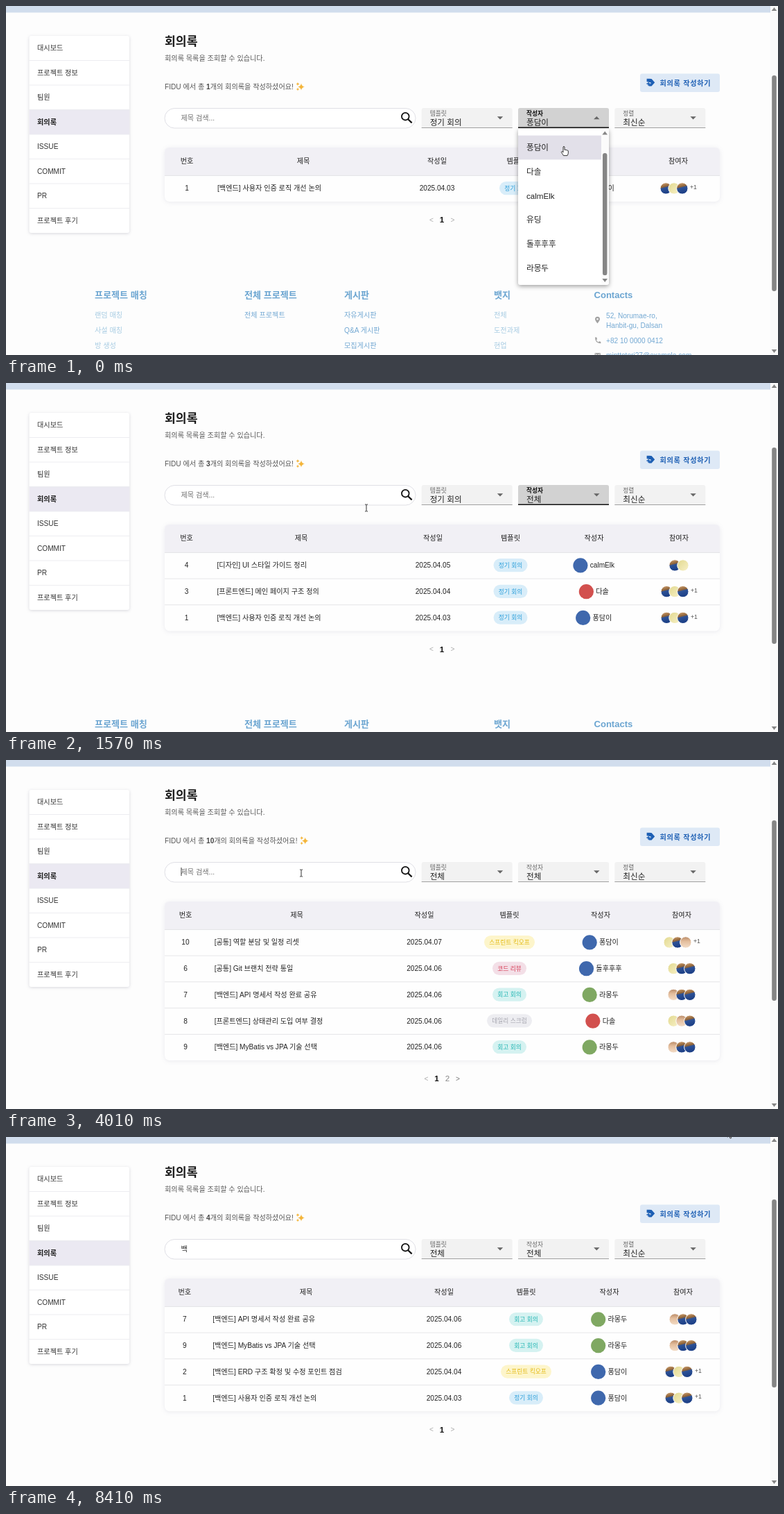
Animation, 1114 px wide and 503 px high, one loop 8510 ms. Source, as an HTML page:

```html
<!DOCTYPE html>
<html lang="ko">
<head>
<meta charset="utf-8">
<title>회의록</title>
<style>
html, body { margin: 0; width: 100%; height: 100%; overflow: hidden; background: #fdfdfd; }
svg { display: block; width: 1114px; height: 503px; }
text { font-family: "Liberation Sans", "Noto Sans CJK KR", "Noto Sans CJK", sans-serif; white-space: pre; }
.card { filter: drop-shadow(0 1px 2px rgba(60, 60, 90, .2)); }
.soft { filter: drop-shadow(0 1px 3px rgba(60, 60, 110, .1)); }
.pop { filter: drop-shadow(0 2px 3px rgba(0, 0, 0, .38)); }
</style>
</head>
<body>
<svg id="stage" viewBox="0 0 1114 503" xmlns="http://www.w3.org/2000/svg">
  <defs>
    <linearGradient id="pA" x1="0" y1="0" x2=".25" y2="1">
      <stop offset=".1" stop-color="#c99a6a"/><stop offset=".42" stop-color="#8d6238"/>
      <stop offset=".52" stop-color="#2d5297"/><stop offset="1" stop-color="#1c3f86"/>
    </linearGradient>
    <linearGradient id="pB" x1="0" y1="0" x2="1" y2="1">
      <stop offset="0" stop-color="#e2d98f"/><stop offset="1" stop-color="#f8f1c8"/>
    </linearGradient>
    <linearGradient id="pC" x1="0" y1="0" x2="0" y2="1">
      <stop offset="0" stop-color="#b98a66"/><stop offset=".4" stop-color="#e3bd9c"/><stop offset="1" stop-color="#f3ddc8"/>
    </linearGradient>
    <clipPath id="listClip"><rect x="739" y="178" width="131" height="223"/></clipPath>
  </defs>
</svg>
<script>
const LOOP = 8510, ROW = 37.75, SMALL = 8.7, BODY = 10.15, LARGE = 11.6;
const stage = document.getElementById('stage');

function el(parent, tag, attrs = {}) {
  const node = document.createElementNS('http://www.w3.org/2000/svg', tag);
  set(node, attrs);
  parent.appendChild(node);
  return node;
}
function set(node, attrs) {
  for (const k in attrs) node.setAttribute(k, attrs[k]);
}
const group = (parent, attrs) => el(parent, 'g', attrs);
const path = (parent, d, attrs) => el(parent, 'path', { d, ...attrs });
const rect = (parent, x, y, width, height, fill, more) =>
  el(parent, 'rect', { x, y, width, height, fill, ...more });
// y is the visual middle of the line
function text(parent, x, y, str, size = BODY, fill = '#333', more = {}) {
  const node = el(parent, 'text', { x, y: y + size * .37, 'font-size': size, fill, ...more });
  node.textContent = str;
  return node;
}
const BOLD = { 'font-weight': 700 }, MEDIUM = { 'font-weight': 500 };
const MID = { 'text-anchor': 'middle' };

const clamp = v => Math.max(0, Math.min(1, v));
const span = (t, a, b) => clamp((t - a) / (b - a));
const ease = p => p * p * (3 - 2 * p);
const show = (node, on) => set(node, { visibility: on ? 'visible' : 'hidden' });
const within = (t, a, b) => t >= a && t < b;

// ---------- page frame ----------
rect(stage, 0, 0, 1114, 503, '#fdfdfd');
rect(stage, 0, 0, 1103, 9.5, '#d1dded');

const ALL = '전체';
const MENU = ['대시보드', '프로젝트 정보', '팀원', '회의록', 'ISSUE', 'COMMIT', 'PR', '프로젝트 후기'];
rect(stage, 33.5, 43, 144.5, 284, '#fff', { rx: 3, class: 'card' });
MENU.forEach((name, i) => {
  const y = 43 + i * 35.5, on = i === 3;
  if (on) rect(stage, 33.5, y, 144.5, 35.5, '#ebe9f2');
  if (i) rect(stage, 33.5, y - .4, 144.5, .8, '#e9e9ee');
  text(stage, 45, y + 17.7, name, BODY, on ? '#1c1c1c' : '#333', on ? BOLD : {});
});

text(stage, 229, 51, '회의록', 17.2, '#1a1a1a', BOLD);
text(stage, 229, 75.5, '회의록 목록을 조회할 수 있습니다.', BODY, '#5a5a5a');

const summary = text(stage, 229, 116, '', BODY, '#555');
summary.append('FIDU 에서 총 ');
const count = el(summary, 'tspan', { 'font-weight': 700, fill: '#444' });
summary.append('개의 회의록을 작성하셨어요!');
const sparkle = group(stage, { fill: '#f4b53a' });
const star = (x, y, r) => path(sparkle,
  `M${x} ${y - r}Q${x + r * .15} ${y - r * .15} ${x + r} ${y}Q${x + r * .15} ${y + r * .15} ${x} ${y + r}` +
  `Q${x - r * .15} ${y + r * .15} ${x - r} ${y}Q${x - r * .15} ${y - r * .15} ${x} ${y - r}Z`);
star(426, 116.5, 5); star(421, 112.5, 2.4); star(421, 120, 2.2);

rect(stage, 915, 97.5, 115, 26.5, '#dee9f6', { rx: 3 });
path(stage, 'M927.6 105H931.5L936.2 110.3 931.5 115.6H927.6V112.6H930.4V110H927.6Z', { fill: '#1d5fb4' });
path(stage, 'M924.6 104.8H929.8V109.2H924.6Z', { fill: '#1d5fb4' });
path(stage, 'M927 109.4V114.8M924.4 112.1H929.7', { stroke: '#1d5fb4', 'stroke-width': 1.5 });
text(stage, 943.5, 111, '회의록 작성하기', BODY, '#1d5fb4', { 'font-weight': 700, 'letter-spacing': .72 });

// ---------- search ----------
rect(stage, 229, 147.5, 362, 28.5, '#fff', { rx: 14.2, stroke: '#dcdce2', 'stroke-width': .9 });
const query = text(stage, 252.5, 161, '', BODY);
const underline = rect(stage, 252.5, 166, 9.4, .8, '#333');
const caret = rect(stage, 252.5, 155, .9, 12, '#222');
el(stage, 'circle', { cx: 576.3, cy: 159.2, r: 5.3, fill: 'none', stroke: '#111', 'stroke-width': 1.8 });
path(stage, 'M580.2 163.2L585.6 168.4', { stroke: '#111', 'stroke-width': 2.2 });

// ---------- tables ----------
const USERS = { p: ['퐁담이', '#3f68ad'], e: ['calmElk', '#3f68ad'], d: ['다솔', '#d2504e'], s: ['돌후후후', '#3f68ad'], r: ['라몽두', '#7fa862'] };
const TAGS = {
  reg: ['정기 회의', '#d8edf9', '#2d9fda'], kick: ['스프린트 킥오프', '#fdf5cb', '#e3b90f'],
  code: ['코드 리뷰', '#f3dfe7', '#d63b55'], retro: ['회고 회의', '#d5f2f1', '#22b5b3'],
  daily: ['데일리 스크럼', '#ededf1', '#a5a5ae']
};
const NOTES = {
  1: ['[백엔드] 사용자 인증 로직 개선 논의', '03', 'reg', 'p', 'ABA+'],
  2: ['[백엔드] ERD 구조 확정 및 수정 포인트 점검', '04', 'kick', 'p', 'ABA+'],
  3: ['[프론트엔드] 메인 페이지 구조 정의', '04', 'reg', 'd', 'ABA+'],
  4: ['[디자인] UI 스타일 가이드 정리', '05', 'reg', 'e', 'AB'],
  6: ['[공통] Git 브랜치 전략 통일', '06', 'code', 's', 'BAA'],
  7: ['[백엔드] API 명세서 작성 완료 공유', '06', 'retro', 'r', 'CAA'],
  8: ['[프론트엔드] 상태관리 도입 여부 결정', '06', 'daily', 'd', 'BCA'],
  9: ['[백엔드] MyBatis vs JPA 기술 선택', '06', 'retro', 'r', 'CAA'],
  10: ['[공통] 역할 분담 및 일정 리셋', '07', 'kick', 'p', 'BAC+']
};
// cols: number, title, title text start, date, template, author, participants
const VIEWS = [
  { from: 0, total: 1, ids: [1], cols: [261, 429, 305, 622, 736.5, 852, 970], thumb: [100, 411] },
  { from: 1240, total: 3, ids: [4, 3, 1], cols: [260.5, 426, 304.5, 616, 728, 848.5, 971], thumb: [93, 376] },
  { from: 3440, total: 10, ids: [10, 6, 7, 8, 9], cols: [259, 419.5, 300.7, 603.5, 726.5, 858, 975], thumb: [87, 347] },
  { from: 6810, total: 4, ids: [7, 9, 2, 1], cols: [257.8, 433, 298.3, 632, 750.5, 870.5, 977], thumb: [90, 361] }
];
const HEADS = ['번호', '제목', null, '작성일', '템플릿', '작성자', '참여자'];
const textWidth = (str, size) => [...str].reduce((w, c) => w + (c === ' ' ? .278 : c > '~' ? .92 : .5), 0) * size;

function drawRow(g, id, y, c) {
  const [title, day, tag, user, people] = NOTES[id];
  text(g, c[0], y, id, BODY, '#222', MID);
  text(g, c[2], y, title, BODY, '#222');
  text(g, c[3], y, '2025.04.' + day, BODY, '#222', MID);

  const [label, bg, ink] = TAGS[tag], w = textWidth(label, SMALL) + 14.5;
  rect(g, c[4] - w / 2, y - 9.7, w, 19.4, bg, { rx: 9.7 });
  text(g, c[4], y, label, SMALL, ink, { ...MID, ...MEDIUM });

  const [name, tint] = USERS[user], nameW = textWidth(name, BODY), left = c[5] - (nameW + 25) / 2;
  el(g, 'circle', { cx: left + 10.7, cy: y + .3, r: 10.6, fill: tint });
  text(g, left + 24.5, y, name, BODY, '#222');

  const more = people.endsWith('+'), faces = people.replace('+', '');
  const first = c[6] - (faces.length - 1) * 5.9 - (more ? 6 : 0);
  [...faces].forEach((f, i) => el(g, 'circle', {
    cx: first + i * 11.8, cy: y + .3, r: 8.2, fill: `url(#p${f})`, stroke: '#fff', 'stroke-width': 1
  }));
  if (more) text(g, c[6] + 17, y - 1.6, '+1', SMALL, '#555');
}

for (const v of VIEWS) {
  const g = v.node = group(stage), c = v.cols, n = v.ids.length, bottom = 244.3 + n * ROW;
  rect(g, 229, 204, 801, bottom - 204, '#fefefe', { rx: 7, class: 'soft' });
  path(g, 'M229 244.3V211Q229 204 236 204H1023Q1030 204 1030 211V244.3Z', { fill: '#f1f0f5' });
  rect(g, 229, 243.9, 801, .8, '#dcdce0');
  HEADS.forEach((h, i) => h && text(g, c[i], 223.5, h, BODY, '#1f1f1f', { ...MID, ...MEDIUM }));
  v.ids.forEach((id, i) => {
    drawRow(g, id, 262.6 + i * ROW, c);
    if (i < n - 1) rect(g, 229, 243.9 + (i + 1) * ROW, 801, .8, '#e0e0e3');
  });
  const y = 308 + (n - 1) * ROW;
  const pager = v.total > 5
    ? [[606.5, '<', '#aaa'], [621.5, '1', '#111'], [637, '2', '#888'], [652, '>', '#777']]
    : [[614, '<', '#aaa'], [629, '1', '#111'], [644.5, '>', '#aaa']];
  pager.forEach(([x, s, fill]) =>
    text(g, x, y, s, s === '1' || s === '2' ? LARGE : BODY, fill, { ...MID, 'font-weight': s === '1' ? 700 : 400 }));
}

// ---------- footer ----------
const footer = group(stage);
const DEEP = '#74a9d3', PALE = '#a6cbe2';
[[128, '프로젝트 매칭', PALE, ['랜덤 매칭', '사설 매칭', '방 생성']],
 [344, '전체 프로젝트', DEEP, ['전체 프로젝트']],
 [488, '게시판', DEEP, ['자유게시판', 'Q&A 게시판', '모집게시판']],
 [704, '뱃지', PALE, [ALL, '도전과제', '현업']],
 [848.5, 'Contacts', DEEP, []]].forEach(([x, head, ink, links]) => {
  text(footer, x, 416, head, 13.05, '#6ba5d1', BOLD);
  links.forEach((s, i) => text(footer, x, 445.3 + i * 21.8, s, BODY, ink));
});
[['52, Norumae-ro,', 446], ['Hanbit-gu, Dalsan', 460.3], ['+82 10 0000 0412', 482], ['minttotori27@example.com', 503.5]]
  .forEach(([s, y]) => text(footer, 866, y, s, BODY, DEEP));
path(footer, 'M853.5 457.5C850.8 454 850 452.8 850 451.3A3.5 3.5 0 0 1 857 451.3C857 452.8 856.2 454 853.5 457.5ZM853.5 450A1.3 1.3 0 1 0 853.5 452.6A1.3 1.3 0 1 0 853.5 450Z', { fill: '#a2a2a2', 'fill-rule': 'evenodd' });
path(footer, 'M850 477.6H852.3L853 480.2 851.8 481.5Q852.8 483.5 854.8 484.4L856 483.2 858.3 484V486.2Q850 486.6 850 477.6Z', { fill: '#a2a2a2' });
rect(footer, 849.5, 500, 8.5, 7, '#a2a2a2', { rx: 1 });
path(footer, 'M850.3 501.3L853.7 503.6 857.2 501.3', { fill: 'none', stroke: '#fff', 'stroke-width': .8 });

// ---------- selects ----------
function makeSelect(x, label, value) {
  const g = group(stage);
  const shape = `M${x} 176V150Q${x} 147 ${x + 3} 147H${x + 128}Q${x + 131} 147 ${x + 131} 150V176Z`;
  path(g, shape, { fill: '#f2f2f2' });
  const hover = path(g, shape, { fill: '#e8e7ee', opacity: 0 });
  const shade = path(g, shape, { fill: '#d2d2d2', opacity: 0 });
  rect(g, x, 175.2, 131, .8, '#8c8c8c');
  const line = rect(g, x, 174.5, 131, 1.5, '#111', { opacity: 0 });
  const tag = text(g, x + 12, 155, label, SMALL, '#666');
  const val = text(g, x + 12, 167.3, value, LARGE, '#222');
  const arrow = path(g, 'M-4.2 -2H4.2L0 2.2Z', { fill: '#666' });
  return (focus, open, str, over = 0) => {
    set(hover, { opacity: over });
    set(shade, { opacity: focus });
    set(line, { opacity: focus });
    set(tag, { fill: focus > .5 ? '#111' : '#666', 'font-weight': focus > .5 ? 700 : 400 });
    set(arrow, { transform: `translate(${x + 113.3} 161.3) rotate(${open ? 180 : 0})` });
    val.textContent = str;
  };
}
const template = makeSelect(599.7, '템플릿', ALL);
const author = makeSelect(739, '작성자', ALL);
makeSelect(878.3, '정렬', '최신순')(0, false, '최신순');

// ---------- popup lists ----------
function makeList(x, height, width, names, clip) {
  const root = group(stage);
  rect(root, x, 177, 131, height, '#fff', { rx: 3, class: 'pop' });
  const items = group(clip ? group(root, { 'clip-path': 'url(#listClip)' }) : root);
  const over = rect(items, x, 182, width, 34.8, '#f3f3f5');
  const picked = rect(items, x, 216.8, width, 34.8, '#dcdae3');
  names.forEach((s, i) => text(items, x + 12, 199.2 + i * 34.8, s, LARGE, '#222'));
  const pose = (p, alpha) => {
    const cx = x + 65.5, sx = .75 + .25 * p, sy = .5625 + .4375 * p;
    show(root, alpha > 0);
    set(root, { opacity: alpha, transform: `translate(${cx} 177) scale(${sx} ${sy}) translate(${-cx} -177)` });
  };
  return { root, items, over, picked, pose };
}
const GREY = '#858585';
function scrollArrows(parent, x, top, bottom, fill = GREY) {
  path(parent, `M${x - 3.8} ${top + 2.4}H${x + 3.8}L${x} ${top - 2.4}Z`, { fill });
  path(parent, `M${x - 3.8} ${bottom - 2.4}H${x + 3.8}L${x} ${bottom + 2.4}Z`, { fill });
}
const tplList = makeList(599.7, 220, 131, [ALL, ...Object.values(TAGS).map(t => t[0])]);
const userList = makeList(739, 225, 120, [ALL, '퐁담이', '다솔', 'calmElk', '유딩', '돌후후후', '라몽두'], true);
rect(userList.root, 859, 178, 10.5, 223, '#fbfbfb');
scrollArrows(userList.root, 864.2, 183, 395.5);
const listThumb = rect(userList.root, 861, 189, 6.4, 176, GREY, { rx: 3.2 });

// ---------- page scrollbar ----------
rect(stage, 1103, 0, 11, 503, '#fafafa');
scrollArrows(stage, 1108.5, 4.5, 497.5);
const thumb = rect(stage, 1105.2, 0, 6.6, 10, GREY, { rx: 3.3 });

// ---------- pointer ----------
const pointer = group(stage);
const INK = { fill: '#fff', stroke: '#222', 'stroke-width': .9, 'stroke-linejoin': 'round' };
const kinds = {
  h: path(pointer, 'M-1 1Q0 -.4 1 1V5.4Q2.2 4.6 3 5.6 4.2 5 4.9 6.2 6 5.8 6.3 7V10.2Q6 12 5 13.6H-.6Q-1.4 11.8 -3.2 9.6 -4.2 8 -3 7.6 -2 7.6 -1 9Z', INK),
  a: path(pointer, 'M0 0V10.2L2.4 8.1 4.1 12 5.7 11.3 4.1 7.5H7.2Z', INK),
  i: path(pointer, 'M-2 -5H-.5L0 -4.5 .5 -5H2M0 -4.5V4.5M-2 5H-.5L0 4.5 .5 5H2', { fill: 'none', stroke: '#333', 'stroke-width': 1 })
};
const MOVES = [
  [0, 805, 202, 'h'], [40, 805, 202, 'h'], [140, 805, 199, 'h'], [1060, 805, 199, 'h'],
  [1100, 760, 196, 'a'], [1240, 560, 182, 'i'], [1300, 520, 180, 'i'], [2100, 520, 180, 'i'],
  [2260, 602, 166, 'h'], [2440, 664, 162, 'h'], [2520, 666, 164, 'h'], [2740, 681, 192, 'h'],
  [2940, 672, 194, 'h'], [3010, 664, 193, 'a'], [3240, 527, 176, 'a'], [3440, 527, 176, 'a'],
  [3560, 500, 168, 'i'], [3880, 430, 163, 'i'], [4010, 426, 163, 'i'], [5110, 426, 163, 'i'],
  [5300, 602, 167, 'h'], [5370, 650.5, 168.5, 'h'], [6440, 650.5, 168.5, 'h'], [6700, 578, 160, 'h'],
  [6840, 577, 160, 'h'], [7840, 577, 160, 'h'], [7900, 610, 140, 'a'], [8180, 1040, -7, 'a'],
  [8380, 1040, -7, 'a'], [8410, 1041, -10, 'a']
];
function movePointer(t) {
  let i = MOVES.length - 1;
  while (i && t < MOVES[i][0]) i--;
  const a = MOVES[i], b = MOVES[i + 1] || a;
  const p = b === a ? 0 : span(t, a[0], b[0]);
  set(pointer, { transform: `translate(${a[1] + (b[1] - a[1]) * p} ${a[2] + (b[2] - a[2]) * p})` });
  const hidden = within(t, 4740, 5110);
  for (const k in kinds) show(kinds[k], k === a[3] && !hidden);
}

// ---------- time ----------
function draw(t) {
  const view = VIEWS.filter(v => t >= v.from).pop();
  VIEWS.forEach(v => set(v.node, { display: v === view ? 'inline' : 'none' }));
  set(footer, { transform: `translate(0 ${(view.ids.length - 1) * ROW})` });
  set(thumb, { y: view.thumb[0], height: view.thumb[1] - view.thumb[0] });
  count.textContent = view.total;
  set(sparkle, { transform: `translate(${view.total > 9 ? 5.7 : 0} 0)` });

  author(1 - span(t, 2440, 2600), t < 1030, t < 1030 ? '퐁담이' : ALL);
  const over = Math.max(span(t, 2260, 2400) * (t < 2640), span(t, 5290, 5360) * (1 - span(t, 6560, 6640)));
  template(span(t, 2440, 2600) * (1 - span(t, 3880, 4010)), within(t, 2440, 2980), t < 2980 ? '정기 회의' : ALL, over);

  const closeUser = ease(span(t, 1030, 1220));
  userList.pose(1 - closeUser, 1 - closeUser);
  const scroll = 30.2 * (1 - ease(span(t, 440, 900)));
  set(userList.items, { transform: `translate(0 ${-scroll})` });
  set(listThumb, { y: 189 + scroll * .765 });
  set(userList.picked, { fill: t < 440 ? '#e2e0e9' : '#dcdae3' });
  show(userList.over, within(t, 970, 1200));

  const openTpl = 1 - (1 - span(t, 2440, 2690)) ** 3, closeTpl = ease(span(t, 2980, 3200));
  tplList.pose(openTpl * (1 - closeTpl), openTpl * (1 - closeTpl));
  show(tplList.over, within(t, 2780, 3180));

  const typed = t < 4740 ? '' : t < 4840 ? 'ㅂ' : t < 4940 ? '배' : '백';
  query.textContent = typed || '제목 검색...';
  set(query, { fill: typed ? '#222' : '#707070' });
  show(underline, typed && t < 6700);
  show(caret, within(t, 4010, 4510) || within(t, 4740, 5210) || within(t, 5740, 6280));
  set(caret, { x: typed ? 262.4 : 252.5 });

  movePointer(t);
}
const start = performance.now();
function tick() {
  draw((performance.now() - start) % LOOP);
  requestAnimationFrame(tick);
}
tick();
</script>
</body>
</html>
```
